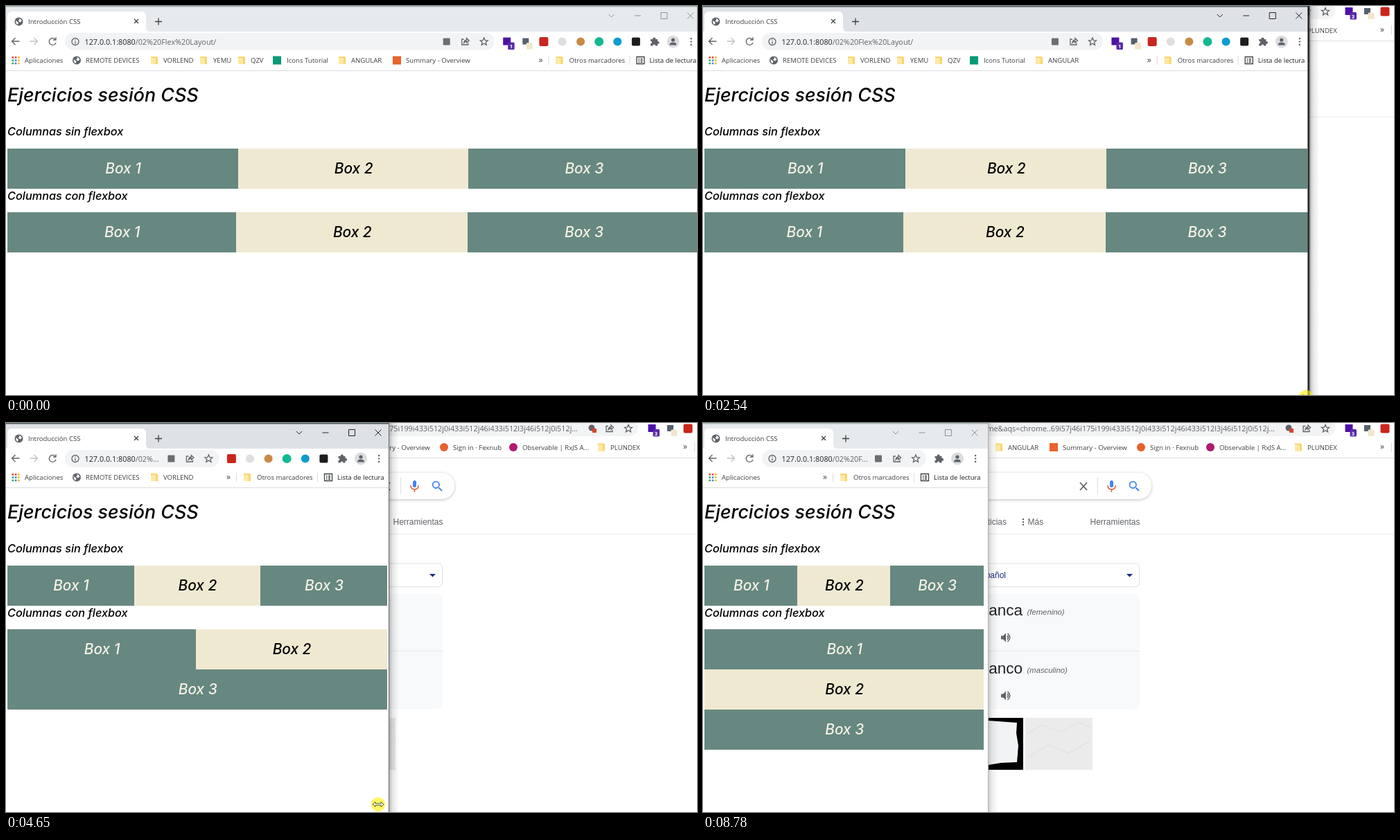
Recreate the animation shown at these times as an HTML page. Size 997x562 px, loop 8.84 s.

```html
<!DOCTYPE html>
<html lang="es">
<head>
<meta charset="utf-8">
<title>Flex layout resize</title>
<style>
html, body { margin: 0; width: 100%; height: 100%; overflow: hidden; background: #fff; }
svg { display: block; }
text { white-space: pre; }
.ui { font: 9.6px "Open Sans", "Noto Sans", sans-serif; fill: #3c4043; }
.url { font: 10.8px "Open Sans", "Noto Sans", sans-serif; fill: #5f6368; }
.page { font: italic 500 16.3px Inter, sans-serif; fill: #000; }
.page .title { font-size: 26.8px; }
.page .label { font-size: 20.8px; text-anchor: middle; }
.web { font: 12px "Liberation Sans", Arial, sans-serif; fill: #5f6368; }
.word { font-size: 22.5px; fill: #202124; text-anchor: end; }
.note { font-size: 11.3px; font-style: italic; }
.line { fill: none; stroke: #5f6368; stroke-width: 1.3; }
.badge { font: 700 7.5px "Open Sans", sans-serif; fill: #fff; text-anchor: middle; }
</style>
</head>
<body>
<svg width="997" height="562" viewBox="0 0 997 562">
  <defs>
    <clipPath id="paint"><rect id="paintBox" height="562"/></clipPath>
    <linearGradient id="shade">
      <stop offset="0" stop-color="#000" stop-opacity=".3"/>
      <stop offset=".4" stop-color="#000" stop-opacity=".1"/>
      <stop offset="1" stop-color="#000" stop-opacity="0"/>
    </linearGradient>
    <filter id="soft" x="-5%" y="-30%" width="110%" height="170%">
      <feDropShadow dx="0" dy="1" stdDeviation="2" flood-color="#202124" flood-opacity=".28"/>
    </filter>
    <path id="star" class="line" d="M0-5.5 1.6-1.8 5.5-1.6 2.5 1 3.5 4.9 0 2.7-3.5 4.9-2.5 1-5.5-1.6-1.6-1.8Z"/>
    <path id="share" class="line" d="M-2-3.5H-5V4.5H4V2M-2 1.5Q-1-2.5 2-2.5V-5L5.5-1.5 2 1.5V-.5Q0-.5-2 1.5Z"/>
    <g id="folder">
      <path fill="#f9d56e" d="M-5-5.5H3.5L5-4V5.5H-5Z"/>
      <path fill="#fde9a6" d="M-5-3.5H2V5.5H-5Z"/>
    </g>
    <g id="globe">
      <circle r="6" fill="#5f6368"/>
      <path fill="#fff" d="M-4.5-1.5Q-2 0-1 1T-2 4.5Q-4.5 2.5-4.5-1.5ZM0-4.5Q3.5-4 4.3-1L2 1-1-1 1-2.5Z"/>
    </g>
    <g id="apps"></g>
    <g id="layers">
      <rect x="-5.5" y="-6" width="11" height="11" fill="#4c12a8"/>
      <rect x="1.5" y="1" width="9.5" height="10.5" rx="1.5" fill="#5a2aa8"/>
    </g>
    <g id="picker">
      <rect x="-4" y="-5" width="9" height="9" fill="#54606c"/>
      <rect x="1.5" y="1.5" width="9" height="9.5" rx="1.5" fill="#f2e6cd"/>
    </g>
    <rect id="red" x="-6.5" y="-6.5" width="13" height="13" rx="2" fill="#c9261c"/>
    <circle id="pale" r="6" fill="#dedede"/>
    <circle id="tan" r="6" fill="#c98a45"/>
    <circle id="green" r="6.5" fill="#15b890"/>
    <circle id="blue" r="6" fill="#0d9bd0"/>
    <rect id="black" x="-6" y="-6" width="12" height="12" rx="2" fill="#1d1d1d"/>
    <path id="puzzle" fill="#5f6368" d="M-5.5-3.5H-2.2A2 2 0 1 1 1.7-3.5H4.5V-.6A2 2 0 1 1 4.5 3.2V6H1.5A1.9 1.9 0 0 0-2.3 6H-5.5V2.8A1.9 1.9 0 0 0-5.5-1Z"/>
    <g id="speaker" fill="#5f6368">
      <path d="M-7-2.5H-4L0-6.5V6.5L-4 2.5H-7Z"/>
      <path fill="none" stroke="#5f6368" stroke-width="1.6" d="M2-3Q4.5 0 2 3M2.5-6Q9 0 2.5 6"/>
    </g>
  </defs>

  <rect width="997" height="562" fill="#fff"/>
  <g id="behind">
    <rect x="-20" y="-6" width="932" height="25" rx="12" fill="#f1f3f4"/>
    <text class="url" x="825" y="12" text-anchor="end">&amp;sourceid=chrome&amp;aqs=chrome..69i57j46i175i199i433i512j0i433i512j46i433i512l3j46i512j0i512j...</text>
    <circle cx="845" cy="7" r="4.5" fill="#5f6368"/><rect x="846" y="8" width="6" height="6" fill="#d6452f"/>
    <use href="#share" x="871" y="8"/><use href="#star" x="898" y="8"/>
    <use href="#layers" x="932" y="8"/><text class="badge" x="938" y="17.5">3</text>
    <use href="#picker" x="958" y="8"/><use href="#red" x="984" y="8"/>
    <use href="#folder" x="427" y="35"/><rect x="500" y="29" width="12" height="12" fill="#e8642a"/>
    <circle cx="632" cy="35" r="6" fill="#e8612c"/><circle cx="732" cy="35" r="6" fill="#b0196e"/>
    <use href="#folder" x="859" y="35"/>
    <g class="ui">
      <text x="440" y="38.5">ANGULAR</text><text x="519" y="38.5">Summary - Overview</text>
      <text x="645" y="38.5">Sign in · Fexnub</text><text x="745" y="38.5">Observable | RxJS A...</text>
      <text x="872" y="38.5">PLUNDEX</text><text x="977" y="38" font-size="12">»</text>
    </g>
    <path stroke="#dadce0" d="M993.5 28V42M0 50.5H997"/>
    <path stroke="#ebebeb" d="M0 160.5H997"/>
    <rect x="60" y="72" width="587" height="38" rx="19" fill="#fff" filter="url(#soft)"/>
    <path class="line" style="stroke-width:1.8" d="M544 86 554 97M554 86 544 97"/>
    <path stroke="#dadce0" d="M569.5 79V103"/>
    <rect x="587" y="83" width="5" height="10" rx="2.5" fill="#4285f4"/>
    <path fill="none" stroke="#e0603c" stroke-width="1.6" d="M584 90Q584 96 589.5 96T595 90M589.5 96V100"/>
    <path fill="none" stroke="#4285f4" stroke-width="1.9" d="M624.5 93.5 629 98"/>
    <circle cx="620.3" cy="89.3" r="4.7" fill="none" stroke="#4285f4" stroke-width="1.8"/>
    <g class="web">
      <text x="438" y="146.5" text-anchor="end">Noticias</text>
      <text x="468.5" y="146.5">Más</text><text x="558.5" y="146.5">Herramientas</text>
      <path d="M461 138h2v2h-2zm0 4h2v2h-2zm0 4h2v2h-2z"/>
      <rect x="200" y="203" width="429.5" height="33.5" rx="6" fill="#fff" stroke="#dfe1e5"/>
      <text x="437" y="223.5" text-anchor="end" fill="#1a2a80">español</text>
      <path fill="#1a2a80" d="M611 218h9l-4.5 4.5z"/>
      <rect x="180" y="247" width="450" height="166" rx="8" fill="#f8f9fa"/>
      <path stroke="#e6e8eb" d="M180 329.5H630"/>
      <text class="word" x="461" y="278">blanca</text><text class="note" x="467.5" y="277">(femenino)</text>
      <text class="word" x="461" y="362">blanco</text><text class="note" x="467.5" y="361">(masculino)</text>
    </g>
    <use href="#speaker" x="437" y="310"/><use href="#speaker" x="437" y="394"/>
    <rect x="366" y="426" width="96" height="75"/>
    <path fill="#f1f3f5" d="M375 432 412 430 453 433 452 448 455 466 453 490 430 491 412 494 375 492Z"/>
    <rect x="465" y="426" width="97" height="75" fill="#ebebeb"/>
    <path fill="none" stroke="#e3e3e3" stroke-width="1.5" d="M467 449 490 436 516 447 541 432 560 440M470 482 498 465 527 477 558 460"/>
  </g>

  <rect id="shadow" width="15" height="562" fill="url(#shade)"/>
  <g id="window" clip-path="url(#paint)">
    <rect width="1010" height="562" fill="#fff"/>
    <rect id="strip" width="1010" height="37"/>
    <rect id="topLine" width="1010" height="1.5"/>
    <path id="tab" fill="#fff"/>
    <use href="#globe" x="18.5" y="22.5"/>
    <text class="ui" x="32" y="25.7">Introducción CSS</text>
    <g id="tabEnd" fill="none" stroke="#3c4043" stroke-width="1.3">
      <path d="M185 19 191 25M191 19 185 25M215 22.5H225M220 17.5V27.5"/>
    </g>
    <path class="line" d="M19.5 51H8.5M13.5 46 8.5 51 13.5 56M71 48A5 5 0 1 0 72 53M72 45V49H68"/>
    <path class="line" style="stroke:#bdc1c6" d="M34.5 51H45.5M40.5 46 45.5 51 40.5 56"/>
    <rect id="omnibox" x="85" y="39" height="24.5" rx="12" fill="#f1f3f4"/>
    <circle class="line" cx="100" cy="51.5" r="5"/><path class="line" d="M100 51V54.5M100 48.4V49.8"/>
    <text class="url" x="113.5" y="55.5"><tspan fill="#202124">127.0.0.1:8080</tspan><tspan id="path"></tspan></text>
    <g id="omniIcons">
      <rect x="-59" y="46.5" width="10" height="10" rx="1" fill="#6a6e73"/>
      <use href="#share" x="-27" y="51.5"/><use href="#star" y="51.5"/>
    </g>
    <g id="bookmarks"></g>
    <g id="right">
      <g id="buttons" fill="none">
        <path d="M-137 12-133 16-129 12M-99.5 14H-90.5M-61.5 9.5H-52.5V18.5H-61.5ZM-23.5 9.5-14.5 18.5M-14.5 9.5-23.5 18.5"/>
      </g>
      <circle cx="-44" cy="51.5" r="9" fill="#dadce0"/>
      <path fill="#5f6368" d="M-49 56.5Q-49 52.5-44 52.5T-39 56.5ZM-46.6 49a2.6 2.6 0 1 0 5.2 0a2.6 2.6 0 1 0-5.2 0"/>
      <path fill="#5f6368" d="M-19 46h2.2v2.2H-19zm0 4.4h2.2v2.2H-19zm0 4.4h2.2v2.2H-19z"/>
      <g class="ui">
        <text x="-238" y="81.5" font-size="12">»</text>
        <text x="-194" y="82">Otros marcadores</text>
        <text x="-78" y="82" fill="#202124">Lista de lectura</text>
      </g>
      <use href="#folder" x="-208" y="78.5"/>
      <path stroke="#dadce0" d="M-223.5 72V85M-106.5 72V85"/>
      <path class="line" style="stroke:#3c4043" d="M-96.5 73.5H-85.5V83.5H-96.5ZM-94 76.5H-92.5M-91-76.5M-91 76.5H-88M-94 78.7H-92.5M-91 78.7H-88M-94 81H-92.5M-91 81H-88"/>
    </g>
    <path stroke="#dadce0" d="M0 93.5H1010"/>
    <g class="page" id="page">
      <text class="title" x="2" y="138">Ejercicios sesión CSS</text>
      <text x="2" y="187">Columnas sin flexbox</text>
      <text x="2" y="279.5">Columnas con flexbox</text>
    </g>
  </g>
  <rect id="gap" height="562"/>
  <rect id="edge" width="1" height="562"/>
  <g id="cursor">
    <circle r="10.3" fill="#ffee00" opacity=".6"/>
    <path id="resize" fill="#fff" stroke="#4a4300" stroke-width=".9" d="M-8 0-4-3.5V-1.2H4V-3.5L8 0 4 3.5V1.2H-4V3.5Z"/>
    <path id="arrow" fill="#fff" stroke="#222" stroke-width=".9" d="M0 0V13L3-.0 3 10.3 5 15 7 14 5 9.7H9Z"/>
  </g>
</svg>
<script>
const LOOP = 8840;
const $ = id => document.getElementById(id);
const move = (node, x, y = 0) => node.setAttribute('transform', `translate(${x} ${y})`);
const show = (node, on) => node.setAttribute('visibility', on ? 'inherit' : 'hidden');

function add(parent, tag, attrs = {}, text = '') {
  const node = document.createElementNS('http://www.w3.org/2000/svg', tag);
  set(node, attrs);
  node.textContent = text;
  return parent.appendChild(node);
}
function set(node, attrs) {
  for (const name in attrs) node.setAttribute(name, attrs[name]);
}

$('arrow').setAttribute('d', 'M0 0V13L3 10.3 5 15 7 14 5 9.7H9Z');

// Launcher dots
const dotColors = ['#ea4335', '#ea4335', '#fbbc04', '#34a853', '#4285f4', '#fbbc04', '#34a853', '#4285f4', '#fbbc04'];
dotColors.forEach((fill, i) => add($('apps'), 'rect',
  { x: -5.5 + i % 3 * 4.3, y: -5.5 + Math.floor(i / 3) * 4.3, width: 2.6, height: 2.6, fill }));

// Extension buttons, from right to left, placed from the right window edge
const extensions = ['puzzle', 'black', 'blue', 'green', 'tan', 'pale', 'red', 'picker', 'layers'].map((icon, i) => {
  const x = -71 - i * 26.6;
  const node = add($('right'), 'g');
  add(node, 'use', { href: '#' + icon, x, y: 51.5 });
  if (icon === 'layers') add(node, 'text', { class: 'badge', x: x + 6.2, y: 61 }, '1');
  return { x, node };
});

const bookmarks = [
  [14, 27, 'Aplicaciones', 'apps'], [102, 115, 'REMOTE DEVICES', 'globe'],
  [214, 227, 'VORLEND', 'folder'], [285, 299, 'YEMU', 'folder'], [340, 353, 'QZV', 'folder'],
  [391, 405, 'Icons Tutorial', '#0a9a78'], [485, 498, 'ANGULAR', 'folder'],
  [564, 577, 'Summary - Overview', '#e8642a']
].map(([iconX, x, name, icon]) => {
  const node = add($('bookmarks'), 'g');
  if (icon[0] === '#') add(node, 'rect', { x: iconX - 6, y: 72.5, width: 12, height: 12, fill: icon });
  else add(node, 'use', { href: '#' + icon, x: iconX, y: 78.5 });
  const label = add(node, 'text', { class: 'ui', x, y: 82 }, name);
  return { node, end: x + label.getComputedTextLength() };
});

const makeBoxes = () => [1, 2, 3].map(n => ({
  rect: add($('page'), 'rect', { height: 58, fill: n === 2 ? '#f0e9d2' : '#668880' }),
  label: add($('page'), 'text', { class: 'label', fill: n === 2 ? '#000' : '#f5f1e6' }, 'Box ' + n)
}));
const floatBoxes = makeBoxes();
const flexBoxes = makeBoxes();

function placeBox({ rect, label }, left, right, y) {
  const x = Math.round(left);
  set(rect, { x, y, width: Math.round(right) - x });
  set(label, { x: (left + right) / 2 + .7, y: y + 36.3 });
}

// time, window edge, layout width, unpainted strip
const sizes = [
  [1250, 1006.5, 1006.5, 0], [1790, 967, 967.5, 0], [2050, 967, 967.5, 0],
  [2950, 782, 790, 4], [3110, 752, 752, 12], [3820, 662, 670, 4],
  [4000, 619, 628, 3], [4650, 552, 556, 0], [4780, 535, 540, 3],
  [5520, 445, 457, 2], [5720, 433, 440, 2], [6070, 411, 411, 0]
];
// time, x, y
const pointer = [
  [1250, 1012, 574], [1790, 970, 571], [2050, 970, 571], [2950, 770, 559], [3110, 734, 558],
  [4000, 615, 554], [4650, 537, 551], [5520, 444, 548], [6070, 401, 548], [6240, 401, 548],
  [6310, 386, 548.5], [6430, 386, 548.5], [6500, 377, 549], [7230, 377, 549],
  [7840, 888, 566], [7910, 920, 590]
];

function valuesAt(keys, t) {
  const next = keys.findIndex(key => key[0] > t);
  if (next === 0) return keys[0];
  if (next < 0) return keys[keys.length - 1];
  const from = keys[next - 1], to = keys[next];
  const span = to[0] - from[0];
  const steps = Math.max(1, Math.round(span / 66));
  const p = Math.floor((t - from[0]) / span * steps) / steps;
  return from.map((v, i) => v + (to[i] - v) * p);
}

function layoutPage(width) {
  const total = width - 8.5;
  floatBoxes.forEach((box, i) => placeBox(box, 2 + total * i / 3, 2 + total * (i + 1) / 3, 206));
  const perRow = Math.max(1, Math.min(3, Math.floor(total / 257)));
  const end = 2 + total + .5;
  const cuts = perRow === 3 ? [2, total / 3 - .7, total * 2 / 3 + .8, end]
    : perRow === 2 ? [2, total / 2, end] : [2, end];
  flexBoxes.forEach((box, i) => {
    const row = Math.floor(i / perRow), col = i % perRow;
    const right = i === 2 ? end : cuts[col + 1];
    placeBox(box, cuts[col], right, 298 + row * 58);
  });
}

function layoutToolbar(width) {
  move($('right'), width);
  let omniEnd = 0;
  for (const { x, node } of extensions) {
    const end = width + x - 18;
    show(node, end >= 300);
    if (end >= 300) omniEnd = end;
  }
  $('omnibox').setAttribute('width', omniEnd - 85);
  move($('omniIcons'), omniEnd - 15);

  const path = $('path'), full = '/02%20Flex%20Layout/';
  const room = omniEnd - 83 - 113.5;
  path.textContent = full;
  for (let n = full.length - 1; n > 0 && path.parentNode.getComputedTextLength() > room; n--)
    path.textContent = full.slice(0, n) + '...';

  for (const { node, end } of bookmarks) show(node, end + 14 < width - 235);

  const shift = Math.min(0, width - 425);
  const r = 202 + shift;
  move($('tabEnd'), shift);
  $('tab').setAttribute('d', `M0 37Q2 37 2 34V15Q2 8 9 8H${r - 7}Q${r} 8 ${r} 15V31Q${r} 37 ${r + 6} 37Z`);
}

function draw(t) {
  const [, edge, width, gap] = valuesAt(sizes, t);
  const focused = t >= 1110 && t < 8780;
  layoutToolbar(width);
  layoutPage(width);

  $('strip').setAttribute('fill', focused ? '#dee1e6' : '#e7eaed');
  $('topLine').setAttribute('fill', focused ? '#4f5b60' : '#aab6b8');
  set($('buttons'), { stroke: focused ? '#222' : '#8f9296', 'stroke-width': 1 });
  $('paintBox').setAttribute('width', edge - gap);
  set($('gap'), { x: edge - gap, width: gap });
  set($('edge'), { x: Math.round(edge), fill: focused ? '#666' : '#b0b0b0' });
  set($('shadow'), { x: edge, opacity: focused ? 1 : .7 });

  const [, x, y] = valuesAt(pointer, t);
  move($('cursor'), x, y);
  show($('resize'), t < 7300);
  show($('arrow'), t >= 7300);
}

const start = performance.now();
function tick() {
  draw((performance.now() - start) % LOOP);
  requestAnimationFrame(tick);
}
tick();
</script>
</body>
</html>
```
